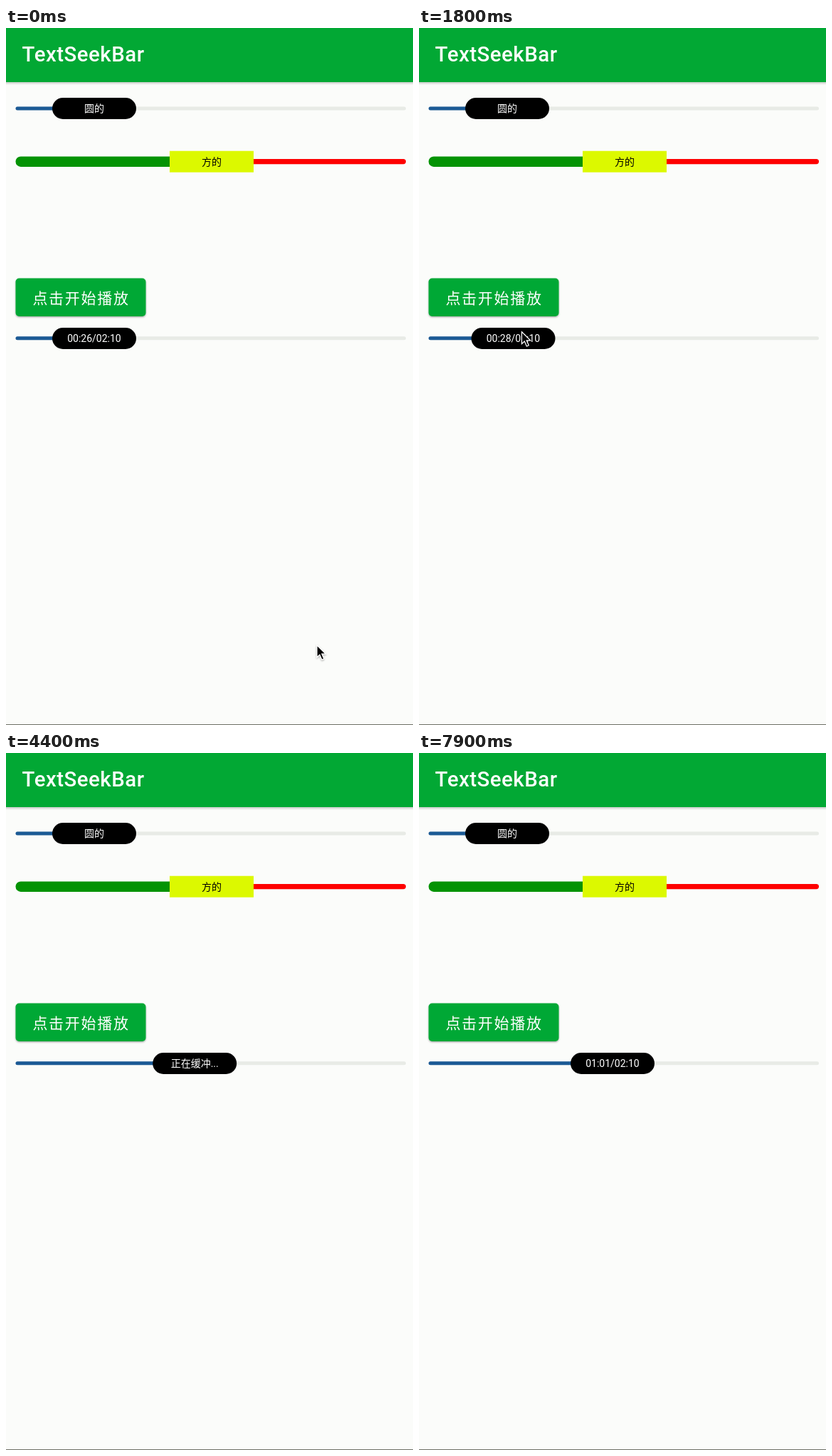
An HTML page for the animation above (8000 ms loop, 572 px wide and 979 px high).

```html
<!DOCTYPE html>
<html lang="zh-CN">
<head>
<meta charset="utf-8">
<title>TextSeekBar</title>
<style>
  html, body { margin: 0; width: 100%; height: 100%; overflow: hidden; background: #fbfcfa; }
  svg { display: block; width: 572px; height: 979px; }
  text { font-family: Roboto, 'Noto Sans CJK SC', 'Noto Sans CJK', sans-serif; }
  .label { font-size: 14px; text-anchor: middle; fill: #fff; }
</style>
</head>
<body>
<svg viewBox="0 0 572 979">
  <defs>
    <linearGradient id="shade" x2="0" y2="1">
      <stop offset="0" stop-color="#000" stop-opacity=".2"/>
      <stop offset="1" stop-color="#000" stop-opacity="0"/>
    </linearGradient>
    <filter id="soft" x="-20%" y="-20%" width="150%" height="150%">
      <feDropShadow dx="0" dy="1.2" stdDeviation="1.2" flood-opacity=".35"/>
    </filter>
  </defs>
  <rect width="572" height="979" fill="#fbfcfa"/>
  <rect y="76" width="572" height="4" fill="url(#shade)"/>
  <rect width="572" height="76" fill="#02a834"/>
  <text x="22.6" y="46.5" font-size="29.4" font-weight="500" letter-spacing=".5" fill="#fff">TextSeekBar</text>

  <g>
    <rect x="13.5" y="110.5" width="548.5" height="5" rx="2.5" fill="#e8ebe6"/>
    <rect x="13.5" y="110.5" width="100" height="5" rx="2.5" fill="#1b5a95"/>
    <rect x="65" y="98" width="118" height="30" rx="15"/>
    <text class="label" x="124" y="118">圆的</text>
  </g>

  <g>
    <rect x="300" y="184" width="262" height="7.2" rx="3.6" fill="#fe0000"/>
    <rect x="13.5" y="180.5" width="270" height="14.4" rx="7.2" fill="#049304"/>
    <rect x="230" y="172.7" width="118" height="30" fill="#dcf900"/>
    <text class="label" x="289" y="192.5" style="fill:#000">方的</text>
  </g>

  <rect x="13.5" y="351.5" width="183" height="53.5" rx="5" fill="#02a834" filter="url(#soft)"/>
  <text x="37.4" y="387" font-size="21" letter-spacing="1.7" fill="#fff">点击开始播放</text>

  <g>
    <rect x="13.5" y="433.2" width="548.5" height="5" rx="2.5" fill="#e8ebe6"/>
    <rect id="fill" x="13.5" y="433.2" width="100" height="5" rx="2.5" fill="#1b5a95"/>
    <g id="thumb">
      <rect y="421" width="118" height="30" rx="15"/>
      <text id="label" class="label" x="59" y="441"></text>
    </g>
  </g>

  <rect y="978" width="572" height="1" fill="#6c6e64"/>
  <path id="cursor" d="M0 0V16.8L3.9 13.2L6.9 20.2L9.8 19L6.8 12.1H12.2Z" stroke="#fff" stroke-width="1.2" filter="url(#soft)"/>
</svg>
<script>
const LOOP = 8000;
const $ = id => document.getElementById(id);
const clamp = v => Math.max(0, Math.min(1, v));
const ease = v => v * v * (3 - 2 * v);
const mix = (a, b, p) => a + (b - a) * p;
const pad = n => String(n).padStart(2, '0');
const clock = s => pad(Math.floor(s / 60)) + ':' + pad(s % 60);

// Thumb position and played seconds
function playback(t) {
  if (t < 3810) {
    const ticks = Math.floor((t + 220) / 1000);
    return { x: 65 + 4.25 * ticks, sec: 26 + ticks };
  }
  if (t < 6000) {
    const p = ease(clamp((t - 3810) / 390));
    return { x: mix(82, 206.2, p), sec: Math.round(mix(30, 59, p)), wait: t >= 4400 };
  }
  const ticks = Math.max(0, Math.floor((t - 5800) / 1000));
  return { x: 206.2 + 3.4 * ticks, sec: 59 + ticks };
}

function moveCursor(t) {
  const a = ease(clamp((t - 50) / 900));
  const b = ease(clamp((t - 1350) / 500));
  const x = mix(mix(437, 304, a), 140, b);
  const y = mix(mix(867, 382, a), 428, b);
  $('cursor').setAttribute('transform', `translate(${x} ${y})`);
  $('cursor').setAttribute('visibility', t < 1900 ? 'visible' : 'hidden');
}

function draw(t) {
  const { x, sec, wait } = playback(t);
  $('thumb').setAttribute('transform', `translate(${x} 0)`);
  $('fill').setAttribute('width', x + 45);
  $('label').textContent = wait ? '正在缓冲...' : clock(sec) + '/02:10';
  moveCursor(t);
}

const start = performance.now();
function tick(now) {
  draw(Math.max(0, now - start) % LOOP);
  requestAnimationFrame(tick);
}
draw(0);
requestAnimationFrame(tick);
</script>
</body>
</html>
```
